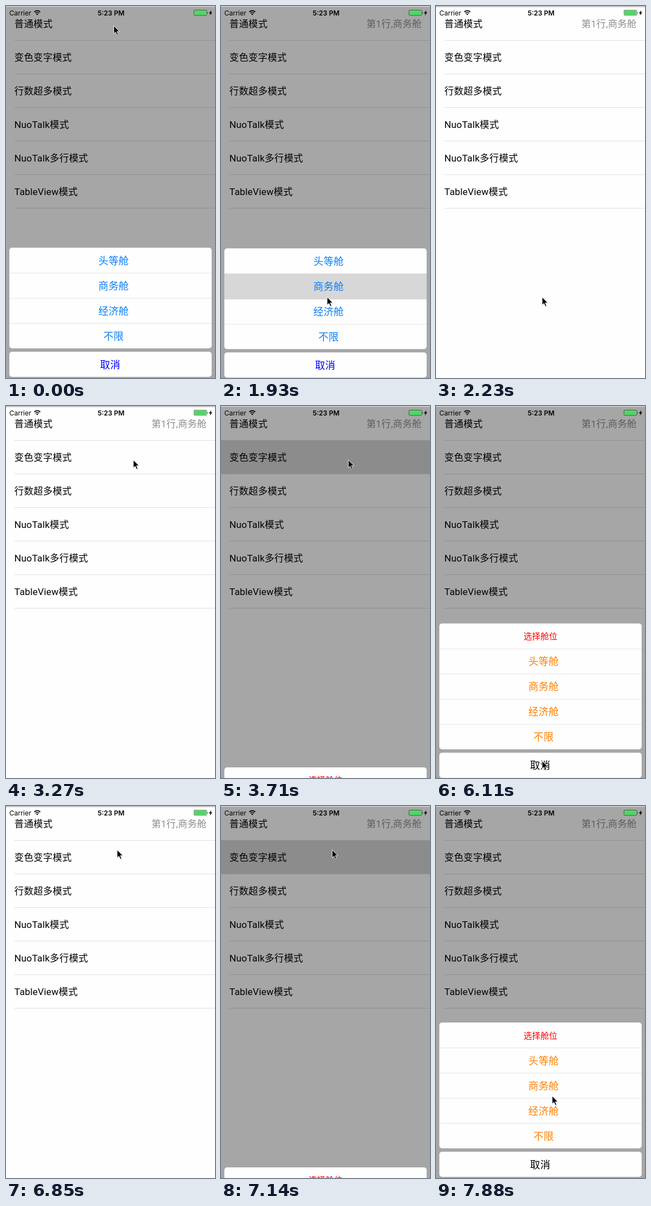
An HTML page for the animation above (8 s loop, 375 by 665 pixels).

```html
<!DOCTYPE html>
<html lang="zh-CN">
<head>
<meta charset="utf-8">
<title>Action sheet</title>
<style>
  html, body { margin: 0; width: 100%; height: 100%; overflow: hidden; background: #fefefe; }
  svg { display: block; width: 375px; height: 665px; }
  text { font: 17px Roboto, "Noto Sans CJK SC", "Noto Sans CJK", sans-serif; letter-spacing: .01em; }
  .bar text { font: 12px Inter, sans-serif; letter-spacing: 0; }
  .bar .clock { font-weight: 600; }
  .mid { text-anchor: middle; }
  .option { font-size: 18px; }
  .title { font-size: 15px; }
</style>
</head>
<body>
<svg id="stage" viewBox="0 0 375 665">
  <rect width="375" height="665" fill="#fefefe"/>
  <rect id="pressed" y="61" width="375" height="61" fill="#d7d7d7"/>
  <g id="list"></g>
  <text id="detail" x="360" y="38" text-anchor="end" fill="#8e8e93">第1行,商务舱</text>
  <rect id="dim" width="375" height="665"/>
  <g class="bar">
    <rect width="375" height="1" fill="#d4d4d4"/>
    <rect y="1" width="375" height="1" fill="#b8b8b8"/>
    <text x="6" y="16.5">Carrier</text>
    <g fill="none" stroke="#000" stroke-width="1.7">
      <path d="M50.7 10.6a7.7 7.7 0 0 1 10.8 0M52.9 12.9a4.6 4.6 0 0 1 6.4 0"/>
    </g>
    <path d="M54.2 14.6a2.7 2.7 0 0 1 3.8 0l-1.9 2z"/>
    <text x="188.5" y="16.5" class="clock mid">5:23 PM</text>
    <rect x="337.25" y="7.25" width="23" height="9.5" rx="1.5" fill="none" stroke="#000" stroke-width=".5"/>
    <rect x="338" y="8" width="21.5" height="8" rx=".8" fill="#4cd964"/>
    <path d="M361 10.5q1.6 1.7 0 3.5z"/>
    <path d="M368.6 7.5l-4.6 5.4h2.6l-1 4.1 4.6-5.5h-2.6z"/>
  </g>
  <g id="blue"></g>
  <g id="orange"></g>
  <g id="cursor">
    <path d="M.5 1.5V16l3.4-3.1 2.4 5.3 2.4-1-2.3-5.2H11z" opacity=".18"/>
    <path d="M.4 .4V14.6l3.3-3.1 2.4 5.4 2.3-1-2.3-5.2h4.5z" stroke="#fff" stroke-width=".9"/>
  </g>
</svg>
<script>
const $ = id => document.getElementById(id);
const LOOP = 8000, TICK = 148.6, H = 665;
const cabins = ['头等舱', '商务舱', '经济舱', '不限'];
const items = ['普通模式', '变色变字模式', '行数超多模式', 'NuoTalk模式', 'NuoTalk多行模式', 'TableView模式'];

$('list').innerHTML = items.map((s, i) =>
  `<text x="15" y="${38 + 60 * i}">${s}</text>
   <rect x="15" y="${61 + 60 * i}" width="360" height="1" fill="#e0dfe2"/>`).join('');

function buildSheet(id, top, color, cancelColor, title) {
  const first = title ? top + 45 : top;
  const card = (y, h) => `<rect x="6" y="${y}" width="363" height="${h}" rx="5" fill="#fefefe"/>`;
  const line = y => `<rect x="6" y="${y}" width="363" height="1" fill="#e4e4e6"/>`;
  $(id).innerHTML = card(top, 612 - top) + card(618, 45) +
    (title ? `<text class="mid title" x="187.5" y="${top + 28.5}" fill="#f00">${title}</text>` + line(first) : '') +
    [1, 2, 3].map(i => line(first + 45 * i)).join('') +
    (title ? '' : `<rect id="chosen" x="6" y="${first + 45}" width="363" height="46" fill="#d7d7d7"/>`) +
    cabins.map((s, i) =>
      `<text class="mid option" x="193" y="${first + 29.5 + 45 * i}" fill="${color}">${s}</text>`).join('') +
    `<text class="mid option" x="187" y="647.5" fill="${cancelColor}">取消</text>`;
}
buildSheet('blue', 432, '#0a7ff5', '#00f');
buildSheet('orange', 387, '#ff8000', '#000', '选择舱位');

// Pointer stops: tick, x, y
const path = [
  [0, 193, 35], [2, 170, 431], [3, 170, 431], [6, 203, 409], [8, 242, 440], [11, 190, 520],
  [16, 190, 520], [19, 240, 270], [21, 236, 83], [22, 228, 96], [28, 228, 96], [30, 200, 340],
  [31, 211, 477], [32, 211, 477], [34, 190, 634], [43, 190, 634], [46, 199, 78],
  [50, 199, 78], [53, 208, 518], [54, 208, 518]
];

function pointer(n) {
  const i = path.findIndex(p => p[0] > n);
  const [a, x, y] = path[i - 1], [b, x2, y2] = path[i];
  const k = (n - a) / (b - a);
  return [x + (x2 - x) * k, y + (y2 - y) * k];
}

const clamp = v => Math.max(0, Math.min(1, v));
const ease = v => (v = clamp(v), v * v * (3 - 2 * v));
// Each slide lasts two ticks
const rise = (n, start) => n < start ? 0 : ease((n - start) / 2 + .16);
const fall = (n, start) => n < start ? 1 : 1 - ease((n - start) / 2 + .045);

function place(id, top, shown) {
  $(id).setAttribute('transform', `translate(0 ${(H - top) * (1 - shown)})`);
  $(id).setAttribute('visibility', shown ? 'visible' : 'hidden');
}

function draw(now) {
  const n = Math.floor((now % LOOP + 6) / TICK);
  const opening = n >= 48 ? 48 : 25;
  const blue = fall(n, 13);
  const orange = n >= 48 ? rise(n, 48) : rise(n, 25) * fall(n, 41);
  const closing = n < 25 ? blue : n >= 41 && n < 48 ? fall(n, 41) : 1;

  place('blue', 432, blue);
  place('orange', 387, orange);
  $('dim').setAttribute('opacity', .35 * closing);
  $('chosen').setAttribute('opacity', n >= 13 ? 1 : 0);
  $('detail').setAttribute('opacity', n >= 13 ? 1 : 0);
  $('pressed').setAttribute('opacity', n < opening ? 0 : clamp(1 - (n - opening) / 2));
  $('cursor').setAttribute('transform', `translate(${pointer(n)})`);
}

const origin = performance.now();
function loop() {
  draw(performance.now() - origin);
  requestAnimationFrame(loop);
}
loop();
</script>
</body>
</html>
```
